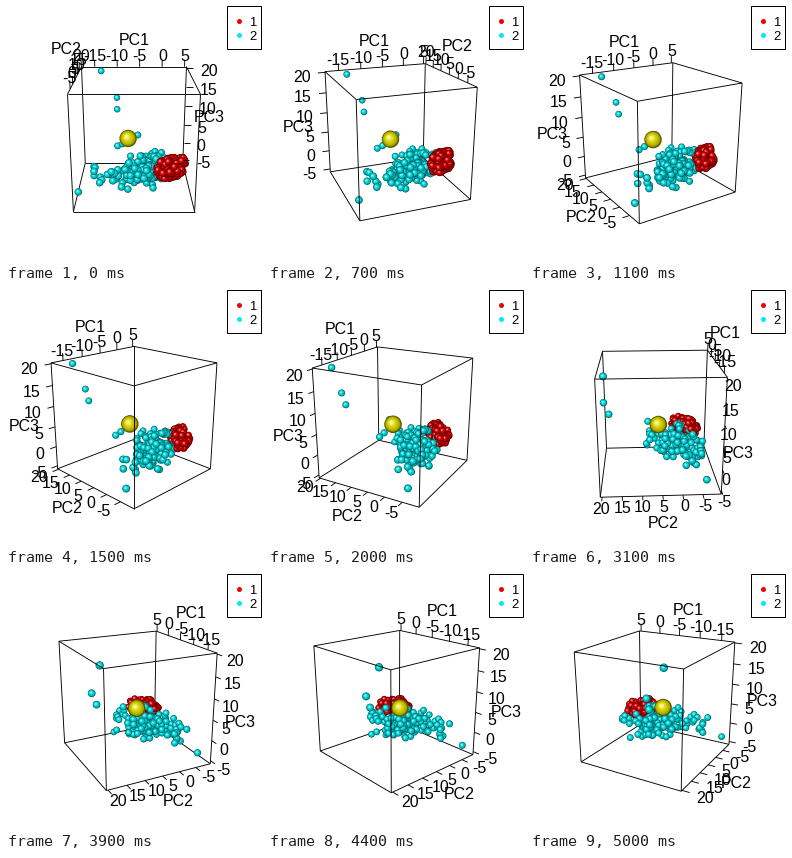
A matplotlib script for the animation above (5100 ms loop, 256x256 px).

```python
import numpy as np
import matplotlib.pyplot as plt
from matplotlib.animation import FuncAnimation
from matplotlib.collections import LineCollection
from matplotlib.patches import Rectangle

SIZE, DPI = 256, 64
PX = 72 / DPI                 # points per pixel
FRAMES, STEP = 51, 3          # degrees turned per frame
FOCAL, DIST = 468, 8.32
TILT = np.radians(20)
TICK = 2 / 15
FONT = 16

RED, CYAN, YELLOW = (0.93, 0, 0), (0, 0.92, 0.94), (0.92, 0.9, 0)
rng = np.random.default_rng(7)


def project(points, angle):
    """Return screen x, screen y, pixels per unit and depth before tilting."""
    x, y, z = np.asarray(points, float).T
    c, s = np.cos(angle), np.sin(angle)
    right, deep = x * c - y * s, x * s + y * c
    up = z * np.cos(TILT) + deep * np.sin(TILT)
    away = deep * np.cos(TILT) - z * np.sin(TILT)
    scale = FOCAL / (DIST + away)
    return 128 + right * scale, 128 - up * scale, scale, deep


def ball(n):
    v = rng.normal(size=(n, 3))
    v /= np.linalg.norm(v, axis=1)[:, None]
    return v * rng.random((n, 1)) ** (1 / 3)


def diagonal(local, center):
    """Turn (along, across, height) offsets into box coordinates."""
    along, across, height = local.T
    h = np.sqrt(0.5)
    return np.c_[(along + across) * h, (along - across) * h, height] + center


# Point clouds, in a box reaching from -1 to 1
reds = diagonal(ball(120) * [0.34, 0.18, 0.2], [0.64, -0.55, -0.4])
core = np.clip(rng.normal(size=(150, 3)), -2.1, 2.1) * [0.27, 0.16, 0.13]
core = diagonal(core, [0.24, -0.3, -0.53])
tail = np.c_[rng.uniform(-0.7, -0.1, 18), rng.uniform(-0.85, -0.4, 18),
             rng.uniform(-0.68, -0.4, 18)]
loners = np.array([
    [-0.62, 0.90, 0.94], [-0.33, 0.93, 0.41], [-0.325, 0.85, 0.20],
    [-0.936, -0.76, -0.76], [-0.30, 0.16, -0.29], [-0.21, 0.12, -0.235],
    [0.07, 0.18, -0.085]])
hub = np.array([[-0.105, 0, -0.085]])

cyans = np.vstack([core, tail, loners])
spheres = np.vstack([reds, cyans, hub])
base = np.array([RED] * len(reds) + [CYAN] * len(cyans) + [YELLOW])
radii = np.r_[np.full(len(spheres) - 1, 0.063), 0.155]

# Each sphere is a stack of shrinking discs from dark rim to highlight
rings = np.linspace(1, 0.16, 7)
light = 0.4 + 0.6 * np.sqrt(1 - rings ** 2)
gloss = np.clip(0.5 - rings, 0, 1) * 2
shaded = base[:, None] * light[:, None]
shaded = shaded + (1 - shaded) * gloss[:, None]

corners = np.array([[x, y, z] for x in (-1, 1) for y in (-1, 1) for z in (-1, 1)])
edges = np.array([(a, b) for a in range(8) for b in range(a + 1, 8)
                  if np.abs(corners[a] - corners[b]).sum() == 2])

# Per axis: title, tick values, units per value, position of zero
AXES = [
    ("PC1", range(-15, 6, 5), 0.0855, 0.535),
    ("PC2", range(-5, 21, 5), 0.0665, -0.36),
    ("PC3", range(-5, 21, 5), 0.0770, -0.555),
]


def axis_edge(k, i):
    """Return a point on the edge that carries axis k and its tick direction."""
    if k == 0:
        return [0, 1 if i <= 30 else -1, 1], [0, 0, 1]
    if k == 1:
        if i < 10:
            return [-1 if i == 0 else 1, 0, 1], [0, 0, 1]
        return [-1, 0, -1], [-1, 0, 0]
    if i == 0:
        return [1, 1, 0], [1, 0, 0]
    return [-1, 1 if i <= 30 else -1, 0], [-1, 0, 0]


def half_width(text):
    return FONT * (0.278 * len(text) - 0.11 * ("-" in text))


fig = plt.figure(figsize=(SIZE / DPI, SIZE / DPI), dpi=DPI, facecolor="white")
ax = fig.add_axes([0, 0, 1, 1])
ax.set_xlim(0, SIZE)
ax.set_ylim(SIZE, 0)
ax.axis("off")


def line_set(z):
    lines = LineCollection([], colors="black", linewidths=0.9 * PX, zorder=z)
    ax.add_collection(lines)
    return lines


def label(x, y, text, size=FONT):
    return ax.text(x, y, text, family="Liberation Sans", fontsize=size * PX,
                   ha="center", va="baseline", zorder=5)


back, front, ticks = line_set(1), line_set(3), line_set(4)
cloud = ax.scatter([], [], linewidths=0, zorder=2)
titles = [label(0, 0, name) for name, *_ in AXES]
marks = [[label(0, 0, str(v)) for v in values] for _, values, *_ in AXES]

# Legend
ax.add_patch(Rectangle((221.5, 0.5), 34, 43, fc="white", ec="black", lw=PX,
                       snap=False, zorder=6))
for y, color, text in ((14.5, RED, "1"), (28.5, CYAN, "2")):
    ax.scatter([232.5], [y], s=(5 * PX) ** 2, color=[color], linewidths=0, zorder=7)
    label(247, y + 5, text, 13).set_zorder(7)


def draw_box(angle):
    x, y, _, _ = project(corners, angle)
    scale = project(corners[edges].mean(axis=1), angle)[2]
    segments = np.c_[x, y][edges]
    behind = scale < FOCAL / DIST
    back.set_segments(segments[behind])
    front.set_segments(segments[~behind])


def draw_spheres(angle):
    x, y, scale, _ = project(spheres, angle)
    order = np.argsort(scale)
    r = (radii * scale)[order, None]
    shift = r * (1 - rings) * 0.25
    cx, cy = x[order, None] - shift, y[order, None] - shift
    cloud.set_offsets(np.c_[cx.ravel(), cy.ravel()])
    cloud.set_sizes(((2 * r * rings * PX) ** 2).ravel())
    cloud.set_facecolors(shaded[order].reshape(-1, 3))


def place_title(k, spot, out, angle):
    x, y, _, _ = (v[0] for v in project([spot + out * TICK * 4], angle))
    if k == 2:
        x += np.sign(x - 128) * (9.5 * np.sin(angle) - 2)
    elif out[2]:
        x += 0.13 * (x - 128)
        y += 1.5
    else:
        y += 9.5
    titles[k].set_position((x, y + 5.5))


def draw_axes(i, angle):
    segments = []
    for k, (_, values, unit, zero) in enumerate(AXES):
        spot, out = (np.array(v, float) for v in axis_edge(k, i))
        place_title(k, spot, out, angle)
        start = np.tile(spot, (len(values), 1))
        start[:, k] = np.array(values) * unit + zero
        x0, y0, _, _ = project(start, angle)
        x1, y1, _, _ = project(start + out * TICK, angle)
        x2, y2, _, deep = project(start + out * TICK * 2, angle)
        segments += list(np.stack([np.c_[x0, y0], np.c_[x1, y1]], axis=1))
        # Labels hang to the side only where their ticks run sideways
        lean = ((x2 - x0) / np.hypot(x2 - x0, y2 - y0)) ** 3
        drop = 1.5 + 3 * np.clip(1.25 - deep, 0, 1.2) if out[2] else 2.5 + 0 * deep
        for j, mark in enumerate(marks[k]):
            dx = lean[j] * half_width(mark.get_text())
            mark.set_position((x2[j] + dx, y2[j] + drop[j] + 5.5))
    ticks.set_segments(segments)


def update(i):
    angle = np.radians(STEP * i)
    draw_box(angle)
    draw_spheres(angle)
    draw_axes(i, angle)
    return []


anim = FuncAnimation(fig, update, frames=FRAMES, init_func=lambda: update(0),
                     interval=100, repeat=True, repeat_delay=0, blit=False)
plt.show()
```
